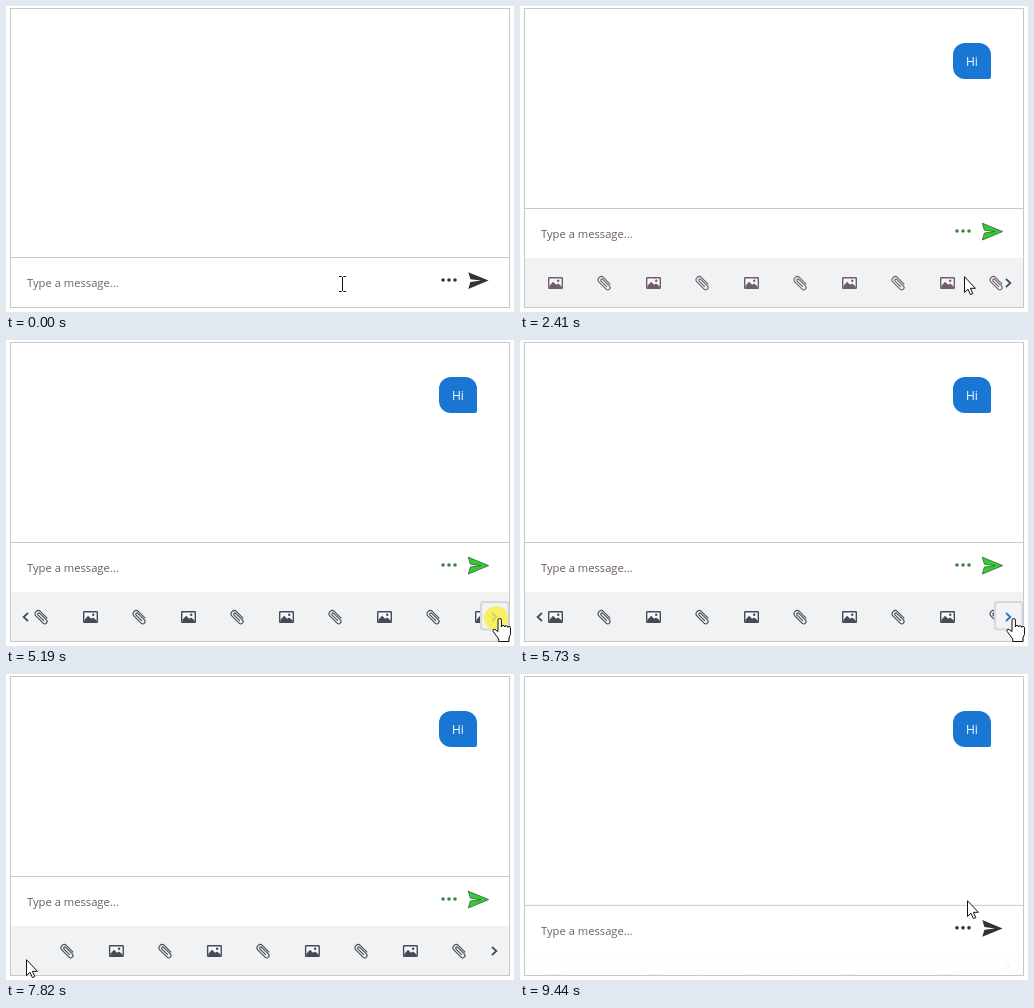
Write an HTML page that moves like this. It is 508 px wide and 306 px high and loops after 9.59 s.

```html
<!DOCTYPE html>
<html lang="en">
<head>
<meta charset="utf-8">
<title>Chat toolbar</title>
<style>
  html, body { margin: 0; width: 100%; height: 100%; overflow: hidden; background: #fff; }
  svg { display: block; }
  text { font-family: "Open Sans", "Noto Sans", sans-serif; }
  .line { fill: none; stroke: #c8c8c8; }
  .chevron { fill: none; stroke-width: 1.7; }
  .ring { fill: #f3f3f5; stroke: #d6d7da; stroke-width: 2; }
  .cursor { stroke: #111; stroke-linejoin: round; fill: #fff; }
</style>
</head>
<body>
<svg width="508" height="306" viewBox="0 0 508 306">
  <defs>
    <clipPath id="panel"><rect x="5" y="3" width="498" height="298"/></clipPath>
    <clipPath id="view"><rect x="26" y="252" width="461" height="49"/></clipPath>
    <g id="image">
      <rect x="-6.8" y="-5.3" width="13.6" height="10.6" rx=".6" fill="#f8f8fa" stroke="currentColor" stroke-width="1.4"/>
      <path d="M-6 5V2.8L-2.4-1.2 .6 1.8 2.6.4 6 3.2V5Z" fill="currentColor"/>
      <circle cx="2.7" cy="-2.3" r="1.2" fill="currentColor"/>
    </g>
    <g id="clip">
      <path transform="rotate(45)" fill="none" stroke="currentColor" stroke-width="1.1"
        d="M5-3.2H-4.5a3.2 3.2 0 0 0 0 6.4H5.5a2.3 2.3 0 0 0 0-4.6H-3.8a1.1 1.1 0 0 0 0 2.4H4.5"/>
    </g>
  </defs>

  <g id="bubble">
    <path fill="#1976d2" d="M445 37h14a12 12 0 0 1 12 12v22a2 2 0 0 1-2 2h-24a12 12 0 0 1-12-12v-12a12 12 0 0 1 12-12Z"/>
    <text x="446" y="60" font-size="12" fill="#fff">Hi</text>
  </g>

  <g clip-path="url(#panel)">
    <g id="bar">
      <g id="slide">
        <rect x="5" y="252" width="498" height="49" fill="#f1f2f4"/>
        <g clip-path="url(#view)"><g id="icons"></g></g>
      </g>
      <g id="buttons">
        <rect id="cover" x="474" y="261" width="29" height="29" fill="#f1f2f4"/>
        <rect id="ringRight" class="ring" x="475" y="262" width="27.5" height="27.5" rx="3"/>
        <rect id="ringLeft" class="ring" x="6" y="262" width="27.5" height="27.5" rx="3"/>
        <path id="right" class="chevron" d="M486 273l4.4 4-4.4 4"/>
        <path id="left" class="chevron" d="M22 273l-4.4 4 4.4 4"/>
      </g>
    </g>
  </g>

  <g id="input">
    <path class="line" d="M5 251.5H503"/>
    <text id="hint" x="21" y="281" font-size="11.2">Type a message...</text>
    <text id="typed" x="21" y="281" font-size="11.8" fill="#333"></text>
    <rect id="caret" y="268" width="1" height="16" fill="#222"/>
    <g id="dots">
      <circle cx="437" cy="274" r="1.8"/>
      <circle cx="443" cy="274" r="1.8"/>
      <circle cx="449" cy="274" r="1.8"/>
    </g>
    <path id="send" stroke-width=".8" stroke-linejoin="round"
      d="M462.3 266.2L482.6 274.6 462.3 283 464.4 276 475 274.6 464.4 273.2Z"/>
  </g>
  <rect class="line" x="4.5" y="2.5" width="499" height="299"/>

  <g id="mouse">
    <circle id="click" cx="-1" r="12" fill="#f8ee3a" fill-opacity=".78"/>
    <path id="beam" fill="none" stroke="#111" d="M-3-7.5h2.5l1 1 1-1h2.5M.5-7V7M-3 7.5h2.5l1-1 1 1h2.5"/>
    <path id="arrow" class="cursor" d="M.5.7V16.5L4 13.2 6.4 18.6 8.8 17.6 6.4 12.3H11.4Z"/>
    <path id="hand" class="cursor" transform="translate(.5 0)"
      d="M.5 13.5V2.2a1.7 1.7 0 0 1 3.4 0V9q0-1.6 1.6-1.6t1.7 1.6q0-1.2 1.5-1.2t1.6 1.6q0-1 1.3-1t1.4 1.5v6.5l-1.6 3.5v3.6H1.2v-2.5L-4.3 13.5q-.9-1.8.6-2.2 1.4-.2 2.3 1.1Z"/>
  </g>
</svg>
<script>
const LOOP = 9590, STEP = 49, ICONS = 12;
const BLUE = '#1976d2', INK = '#333', SLATE = '#424b57';
const el = Object.fromEntries([...document.querySelectorAll('[id]')].map(n => [n.id, n]));

// Each stop of the pointer: it leaves the last place, arrives here, hovers until `release`
const STOPS = [
  { leave: 0, arrive: 0, release: 0, x: 336, y: 278 },
  { leave: 1170, arrive: 1480, release: 2330, x: 444, y: 270, over: 'dots', sag: 10 },
  { leave: 3410, arrive: 3930, release: 6050, x: 491, y: 278, over: 'right', sag: 8 },
  { leave: 6050, arrive: 6500, release: 7740, x: 15, y: 286, over: 'left', sag: 4 },
  { leave: 7760, arrive: 8740, release: 9140, x: 447, y: 226, over: 'dots', sag: 0 }
];
// Clicks, with the direction in which they scroll the icons
const CLICKS = [
  { at: 1710, dir: 0 }, { at: 4260, dir: 1 }, { at: 5190, dir: 1 },
  { at: 6970, dir: -1 }, { at: 7570, dir: -1 }, { at: 8890, dir: 0 }
];

const within = (t, a, b) => t >= a && t < b;
const show = (node, on) => node.setAttribute('display', on ? 'inline' : 'none');
const move = (node, x, y) => node.setAttribute('transform', `translate(${x} ${y})`);
const ease = (t, a, b) => {
  const p = Math.min(1, Math.max(0, (t - a) / (b - a)));
  return p * p * (3 - 2 * p);
};

for (let i = 0; i < ICONS; i++) {
  const use = document.createElementNS('http://www.w3.org/2000/svg', 'use');
  use.setAttribute('href', i % 2 ? '#clip' : '#image');
  move(use, 35.5 + i * STEP, 277);
  el.icons.append(use);
}

function pointer(t) {
  const i = STOPS.findLastIndex(s => s.leave <= t);
  const to = STOPS[i], from = STOPS[i - 1] || to;
  const p = i ? ease(t, to.leave, to.arrive) : 1;
  const over = within(t, to.arrive, to.release) ? to.over : '';
  return {
    x: from.x + (to.x - from.x) * p,
    y: from.y + (to.y - from.y) * p + (to.sag || 0) * Math.sin(Math.PI * p),
    over,
    shape: over ? 'hand' : i ? 'arrow' : 'beam'
  };
}

function drawInput(t, shift, tinted, over) {
  const typing = within(t, 170, 550), letters = typing ? (t < 320 ? 'H' : 'Hi') : '';
  move(el.input, 0, -shift);
  show(el.bubble, t >= 550);
  show(el.hint, !typing);
  show(el.caret, within(t, 90, 720));
  el.typed.textContent = letters;
  el.caret.setAttribute('x', [21, 30, 33][letters.length]);
  el.hint.setAttribute('fill', tinted ? '#6b5a5e' : '#66666b');
  el.dots.setAttribute('fill', over === 'dots' ? BLUE : tinted ? '#3a8342' : INK);
  el.send.setAttribute('fill', tinted ? '#32cd32' : INK);
  el.send.setAttribute('stroke', tinted ? '#3c5a3c' : 'none');
}

function drawBar(t, shift, open, over) {
  const scroll = CLICKS.reduce((sum, c) => sum + c.dir * ease(t, c.at + 90, c.at + 400), 0);
  show(el.bar, shift > 0);
  el.bar.setAttribute('opacity', Math.max(0.04, open));
  move(el.slide, 0, STEP - shift);
  move(el.buttons, 0, (STEP - shift) / 2);
  move(el.icons, -scroll * STEP, 0);
  el.icons.setAttribute('color', t < 4430 ? '#6e5f68' : SLATE);
  show(el.cover, over === 'right');
  show(el.ringRight, within(t, 4260, 6970));
  show(el.ringLeft, within(t, 6970, 7740));
  show(el.left, within(t, 4430, 7740));
  for (const side of ['left', 'right']) el[side].setAttribute('stroke', over === side ? BLUE : SLATE);
}

function drawPointer(t, { x, y, shape }) {
  move(el.mouse, Math.round(x), Math.round(y));
  for (const name of ['beam', 'arrow', 'hand']) show(el[name], name === shape);
  show(el.click, CLICKS.some(c => within(t, c.at, c.at + 160)));
}

function draw(t) {
  const open = ease(t, 1840, 2330) - ease(t, 8980, 9460);
  const shift = t < 1860 ? 0 : 20 + 29 * open;
  const mouse = pointer(t);
  drawInput(t, shift, open > 0.05, mouse.over);
  drawBar(t, shift, open, mouse.over);
  drawPointer(t, mouse);
}

const start = performance.now();
function frame() {
  draw((performance.now() - start) % LOOP);
  requestAnimationFrame(frame);
}
frame();
</script>
</body>
</html>
```
